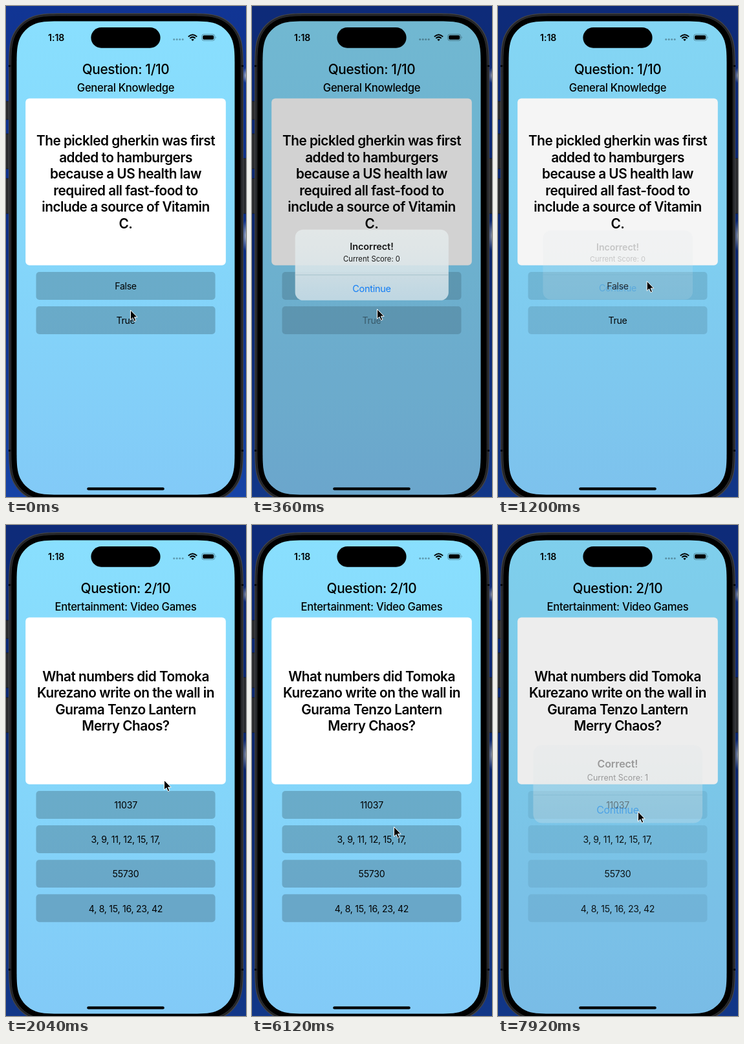
Recreate the animation shown at these times as an HTML page. Size 371x757 px, loop 8000 ms.

```html
<!DOCTYPE html>
<html lang="en">
<head>
<meta charset="utf-8">
<title>Quiz app</title>
<style>
  html, body { margin: 0; width: 100%; height: 100%; overflow: hidden; background: #0d2f85; }
  svg { display: block; width: 100%; height: 100%; }
  text {
    font-family: Inter, "Open Sans", sans-serif;
    font-optical-sizing: none;
    letter-spacing: -.02em;
    text-anchor: middle;
  }
  .title { font-size: 20.8px; font-weight: 500; letter-spacing: -.0165em; }
  .topic { font-size: 16.65px; font-weight: 500; letter-spacing: -.019em; }
  .ask { font-size: 20.8px; font-weight: 600; letter-spacing: -.0245em; }
  .body { font-size: 14.15px; }
  .bold { font-size: 14.15px; font-weight: 600; letter-spacing: -.005em; }
  .small { font-size: 11px; letter-spacing: 0; }
</style>
</head>
<body>
<svg viewBox="0 0 371 757" xmlns="http://www.w3.org/2000/svg">
  <defs>
    <linearGradient id="wall" x1="0" y1="0" x2="0" y2="1">
      <stop offset="0" stop-color="#113594"/>
      <stop offset=".5" stop-color="#0d2d82"/>
      <stop offset="1" stop-color="#1643a6"/>
    </linearGradient>
    <linearGradient id="sky" x1="0" y1="0" x2="0" y2="1">
      <stop offset="0" stop-color="#89dffe"/>
      <stop offset=".5" stop-color="#84d6fa"/>
      <stop offset="1" stop-color="#82caf7"/>
    </linearGradient>
    <linearGradient id="sheet" x1="0" y1="0" x2="0" y2="1">
      <stop offset="0" stop-color="#e5eaeb"/>
      <stop offset=".55" stop-color="#dde7ea"/>
      <stop offset="1" stop-color="#cce0e9"/>
    </linearGradient>
    <radialGradient id="glow">
      <stop offset="0" stop-color="#a3adc0"/>
      <stop offset="1" stop-color="#a3adc0" stop-opacity="0"/>
    </radialGradient>
  </defs>

  <rect width="371" height="757" fill="url(#wall)"/>
  <ellipse cx="371" cy="107" rx="6" ry="12" fill="url(#glow)"/>
  <ellipse cx="371" cy="354" rx="7" ry="24" fill="url(#glow)"/>
  <rect id="shade" width="371" height="757"/>

  <g fill="#2b2c2f" stroke="#111" stroke-width=".6">
    <rect x="-2" y="147" width="7" height="28" rx="1"/>
    <rect x="-2" y="197" width="7" height="54" rx="1"/>
    <rect x="-2" y="266" width="7" height="54" rx="1"/>
    <rect x="366" y="235" width="7" height="85" rx="1"/>
  </g>
  <path id="edge" fill="#434447"/>
  <path id="band" fill="#222326"/>
  <path d="M4 92.500h4M363 92.500h4M4 685.500h4M363 685.500h4" stroke="#0a0a0a" stroke-width="3"/>
  <path id="bezel" stroke="#3e3f42" stroke-width=".7"/>
  <path id="screen" fill="url(#sky)"/>

  <rect x="30.200" y="142.500" width="309.600" height="257.300" rx="6" fill="#fff"/>
  <g id="pages"></g>
  <path id="dim"/>

  <rect x="131.400" y="33" width="107.200" height="31.700" rx="15.850"/>
  <rect x="125.200" y="742.300" width="119.600" height="4.300" rx="2.150"/>
  <text class="bold" x="77.700" y="53.600">1:18</text>
  <g fill-opacity=".3">
    <circle cx="259.700" cy="51.500" r="1.500"/><circle cx="264.200" cy="51.500" r="1.500"/>
    <circle cx="268.700" cy="51.500" r="1.500"/><circle cx="273.200" cy="51.500" r="1.500"/>
  </g>
  <path d="M281.800 47.400Q288.500 41 295.200 47.400M284.300 49.900Q288.500 45.900 292.700 49.900" fill="none" stroke="#000" stroke-width="2"/>
  <path d="M286.300 51.700Q288.500 49.800 290.700 51.700L288.500 53.900Z"/>
  <rect x="302.700" y="43.700" width="20" height="9.600" rx="3" fill="none" stroke="#000" stroke-opacity=".4" stroke-width=".9"/>
  <rect x="304.200" y="45.200" width="17" height="6.600" rx="1.800"/>
  <path d="M323.900 46.800q1.500 1.700 0 3.400z" fill-opacity=".45"/>

  <g id="alert">
    <rect x="69.500" y="346" width="231.500" height="106.500" rx="12" fill="url(#sheet)"/>
    <path d="M69.500 414.300h231.500" stroke="#aac3cc" stroke-width=".8"/>
    <text class="bold" id="verdict" x="185" y="377"></text>
    <text class="small" id="score" x="185" y="394.300"></text>
    <text class="body" x="185" y="439.600" fill="#087aff">Continue</text>
  </g>
  <path id="cursor" d="M0 -.6V14.400L3.400 11.200 5.900 16.700 8.400 15.600 6 10.300H10.600Z" stroke="#fff" stroke-width="1" stroke-linejoin="round"/>
</svg>

<script>
const LOOP = 8000, STEP = 120, SWITCH = 1320;
const $ = id => document.getElementById(id);

// rounded rectangle with continuous-curvature corners
function smoothRect(x, y, w, h, r) {
  const corner = [[1.529, 0], [1.088, 0], [0.868, 0], [0.631, 0.075], [0.373, 0.169],
    [0.169, 0.373], [0.075, 0.631], [0, 0.868], [0, 1.088], [0, 1.529]];
  const place = (sx, sy) => corner.map(([u, v]) =>
    [sx > 0 ? x + u * r : x + w - u * r, sy > 0 ? y + v * r : y + h - v * r]);
  const runs = [place(1, 1), place(1, -1).reverse(), place(-1, -1), place(-1, 1).reverse()];
  return 'M' + runs.map(([p, ...rest]) => `${p}C${rest.join(' ')}`).join('L') + 'Z';
}

const shapes = {
  edge: [4, 11, 363, 755, 60],
  band: [5.2, 12.2, 360.6, 752.6, 59],
  bezel: [7.8, 14.8, 355.4, 747.4, 56],
  screen: [16.5, 23.5, 337, 730, 47],
  dim: [16.5, 23.5, 337, 730, 47]
};
for (const id in shapes) $(id).setAttribute('d', smoothRect(...shapes[id]));

const label = (cls, y, s) => `<text class="${cls}" x="185" y="${y}">${s}</text>`;

function page(id, num, topic, lines, firstY, answers) {
  const ask = lines.map((s, i) => label('ask', firstY + i * 25.6, s)).join('');
  const buttons = answers.map((s, i) => {
    const y = 410 + i * 53.1;
    return `<g class="answer"><rect x="46.5" y="${y}" width="277" height="42.9" rx="5"/>${label('body', y + 27.2, s)}</g>`;
  }).join('');
  return `<g id="${id}">${label('title', 105, `Question: ${num}/10`)}${label('topic', 131.6, topic)}${ask}${buttons}</g>`;
}

$('pages').innerHTML =
  page('first', 1, 'General Knowledge', [
    'The pickled gherkin was first', 'added to hamburgers', 'because a US health law',
    'required all fast-food to', 'include a source of Vitamin', 'C.'
  ], 215, ['False', 'True']) +
  page('second', 2, 'Entertainment: Video Games', [
    'What numbers did Tomoka', 'Kurezano write on the wall in', 'Gurama Tenzo Lantern', 'Merry Chaos?'
  ], 240.6, ['11037', '3, 9, 11, 12, 15, 17,', '55730', '4, 8, 15, 16, 23, 42']);

const answers = [...document.querySelectorAll('.answer')];
const pressed = $('second').querySelector('.answer');

// pointer stops: time, x, y
const stops = [
  [0, 192.5, 469.5], [360, 193.5, 468], [600, 211, 446], [840, 226.5, 425], [1080, 226.5, 425],
  [1440, 237.5, 424.5], [1800, 237.5, 424.5], [1920, 242, 407], [2040, 244.5, 394],
  [4920, 244.5, 394], [5040, 244.5, 398.5], [5160, 243, 425], [5400, 234, 505], [5640, 224.5, 575],
  [5760, 222.5, 584], [5880, 222, 566], [6000, 221, 515], [6120, 219.5, 466],
  [6360, 219.5, 466], [6480, 217, 472], [6600, 215.5, 475.5], [6720, 215.5, 475.5],
  [7200, 216, 455], [7560, 216.5, 443], [8000, 216.5, 442.5]
];

function pointer(t) {
  const i = stops.findIndex(s => s[0] > t);
  const [a, ax, ay] = stops[i - 1], [b, bx, by] = stops[i];
  const k = (t - a) / (b - a);
  return [ax + (bx - ax) * k, ay + (by - ay) * k];
}

// critically damped spring from 0 to 1
function spring(ms) {
  const u = Math.max(0, ms) * 0.014;
  return 1 - (1 + u) * Math.exp(-u);
}

function alertLevel(t) {
  if (t < 960) return t < 840 ? spring(t - 100) : 1;
  if (t < 1440) return 1 - spring(t - 980);
  return spring(t - 7832);
}

function draw(time) {
  const t = Math.floor(time / STEP) * STEP;
  const p = alertLevel(t), second = t >= SWITCH;

  $('shade').setAttribute('opacity', t < STEP ? 0 : 0.18);
  $('first').style.display = second ? 'none' : '';
  $('second').style.display = second ? '' : 'none';
  $('dim').setAttribute('opacity', 0.2 * p);

  for (const a of answers) {
    a.firstChild.setAttribute('fill-opacity', 0.195 - 0.145 * Math.sin(Math.PI * p));
    const held = a === pressed && t >= 7680 ? 0.75 : 1;
    a.lastChild.setAttribute('fill-opacity', held * (1 - 0.78 * p * p));
  }

  const won = t > 5000;
  $('verdict').textContent = won ? 'Correct!' : 'Incorrect!';
  $('score').textContent = 'Current Score: ' + (won ? 1 : 0);
  const leaving = t >= 960 && t < 1440;
  const scale = leaving ? 1 : 1 + 0.2 * (1 - p);
  $('alert').setAttribute('opacity', p);
  $('alert').setAttribute('transform', `translate(185.25 399.25) scale(${scale}) translate(-185.25 -399.25)`);

  $('cursor').setAttribute('transform', `translate(${pointer(t)})`);
}

const start = performance.now();
function tick() {
  draw((performance.now() - start) % LOOP);
  requestAnimationFrame(tick);
}
tick();
</script>
</body>
</html>
```
